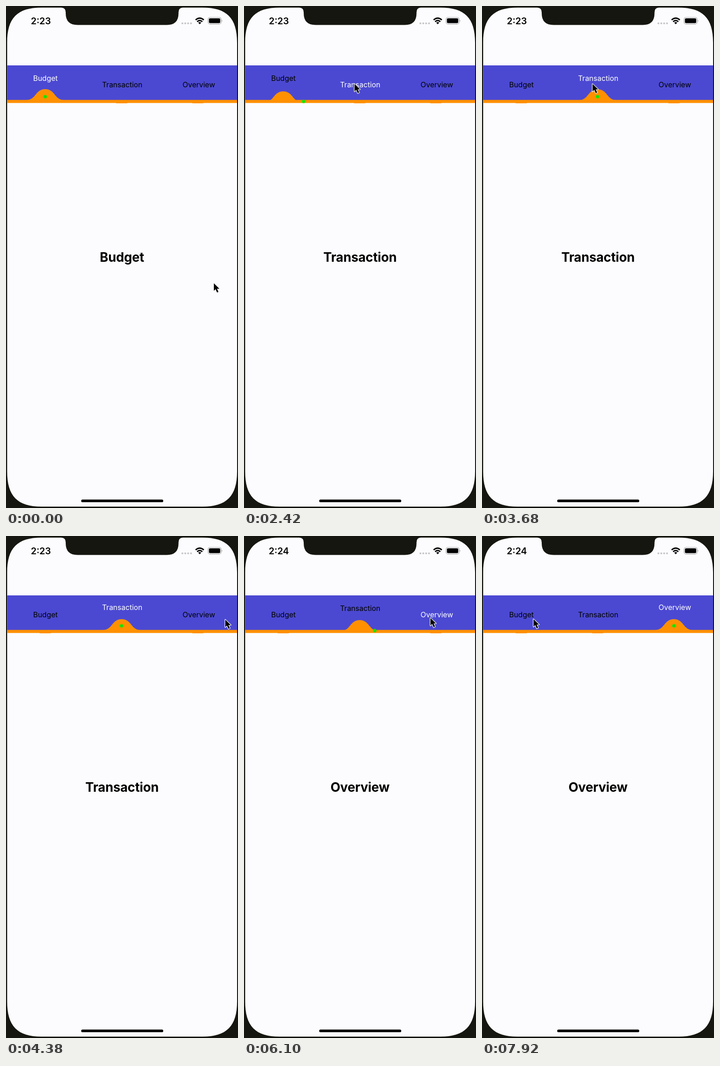
Recreate the animation shown at these times as an HTML page. Size 509x1099 px, loop 8000 ms.

```html
<!DOCTYPE html>
<html lang="en">
<head>
<meta charset="utf-8">
<title>Tab bar</title>
<style>
html, body { margin: 0; width: 100%; height: 100%; overflow: hidden; background: #15160f; }
svg { display: block; width: 100%; height: 100%; font-family: Inter, Roboto, sans-serif; text-anchor: middle; }
.label { font-size: 16px; --on: #fff; --off: #000; }
.title { font-size: 28px; font-weight: 700; letter-spacing: -.15px; --on: #000; --off: transparent; }
.clock { font-size: 20px; font-weight: 600; --on: #000; --off: transparent; }

/* Which tab is selected, and the minute shown */
.first { animation: first 8s step-end infinite; }
.second { animation: second 8s step-end infinite; }
.third { animation: third 8s step-end infinite; }
.before { animation: before 8s step-end infinite; }
.after { animation: after 8s step-end infinite; }
@keyframes first { 0% { fill: var(--on) } 25%, 100% { fill: var(--off) } }
@keyframes second { 0% { fill: var(--off) } 25% { fill: var(--on) } 71.7%, 100% { fill: var(--off) } }
@keyframes third { 0% { fill: var(--off) } 71.7%, 100% { fill: var(--on) } }
@keyframes before { 0% { fill: var(--on) } 58.5%, 100% { fill: var(--off) } }
@keyframes after { 0% { fill: var(--off) } 58.5%, 100% { fill: var(--on) } }

/* Labels lift above the selected bump */
.lift1 { animation: lift1 8s linear infinite; }
.lift2 { animation: lift2 8s linear infinite; }
.lift3 { animation: lift3 8s linear infinite; }
@keyframes lift1 {
  0%, 30.25% { transform: translateY(-14px); animation-timing-function: ease-in-out }
  36%, 100% { transform: none }
}
@keyframes lift2 {
  0%, 34% { transform: none; animation-timing-function: ease-out }
  42% { transform: translateY(-13.4px) }
  46% { transform: translateY(-14px) }
  52%, 74.5% { transform: translateY(-16px) }
  76.25% { transform: translateY(-14px); animation-timing-function: ease-out }
  82%, 100% { transform: none }
}
@keyframes lift3 {
  0%, 80.7% { transform: none; animation-timing-function: ease-out }
  88.7% { transform: translateY(-13.4px) }
  92.7% { transform: translateY(-14px) }
  98.7%, 100% { transform: translateY(-16px) }
}

/* Bumps sink into and rise out of the bar */
.bump1 { animation: bump1 8s linear infinite; }
.bump2 { animation: bump2 8s linear infinite; }
.bump3 { animation: bump3 8s linear infinite; }
@keyframes bump1 {
  0%, 29% { transform: none }
  30.25% { transform: translateY(4.8px) }
  34.5%, 100% { transform: translateY(27px) }
}
@keyframes bump2 {
  0%, 34% { transform: translateY(27px); animation-timing-function: ease-out }
  42% { transform: translateY(.8px) }
  46% { transform: translateY(.4px) }
  52%, 75.4% { transform: none }
  76.25% { transform: translateY(2px) }
  81%, 100% { transform: translateY(27px) }
}
@keyframes bump3 {
  0%, 80.7% { transform: translateY(27px); animation-timing-function: ease-out }
  88.7% { transform: translateY(.8px) }
  98.7%, 100% { transform: none }
}

/* The dot drops, runs along the bar and climbs again */
.run { animation: run 8s cubic-bezier(.455, .03, .515, .955) infinite; }
.drop { animation: drop 8s ease-in-out infinite; }
@keyframes run {
  0%, 25% { transform: translateX(86px) }
  39.75%, 71.7% { transform: translateX(253.4px) }
  86.45%, 100% { transform: translateX(421px) }
}
@keyframes drop {
  0%, 25% { transform: translateY(198.5px) }
  30%, 34.5% { transform: translateY(209px) }
  42% { transform: translateY(199px) }
  46% { transform: translateY(198.5px) }
  52%, 71.7% { transform: translateY(196.6px) }
  76.25% { transform: translateY(207px) }
  77%, 81.2% { transform: translateY(209px) }
  88.7% { transform: translateY(199px) }
  92.7% { transform: translateY(198.5px) }
  98.7%, 100% { transform: translateY(196.6px) }
}

.cursor { animation: cursor 8s ease-in-out infinite; }
@keyframes cursor {
  0%, .25% { transform: translate(455px, 605px); animation-timing-function: linear }
  4.1%, 6% { transform: translate(303px, 300px); animation-timing-function: ease-out }
  14.5%, 16.2% { transform: translate(249px, 190px) }
  23.5%, 46% { transform: translate(241.5px, 168.5px) }
  54.5%, 56.5% { transform: translate(480px, 181px) }
  62%, 66% { transform: translate(398.5px, 171.5px) }
  71%, 84% { transform: translate(408px, 177.5px); animation-timing-function: ease-in }
  89% { transform: translate(290px, 196px); animation-timing-function: ease-out }
  97.2% { transform: translate(105px, 183px) }
  99%, 100% { transform: translate(112px, 180px) }
}
</style>
</head>
<body>
<svg viewBox="0 0 509 1099" preserveAspectRatio="none">
  <defs>
    <clipPath id="bar"><rect x="2.5" y="130" width="504.5" height="82.5"/></clipPath>
    <path id="bump" d="M-42 206C-20 206-22 182 0 182S20 206 42 206Z"/>
  </defs>
  <rect width="509" height="1099" fill="#15160f"/>
  <path fill="#fcfcfe" d="M2.5 80C2.5 26 25 3.5 78 3.5H121Q131 3.5 131 14V16Q131 41.5 157 41.5H353Q378.500 41.500 378.500 16V14Q378.500 3.500 388 3.500H431C484 3.500 507 26 507 80V1019C507 1073 484 1096 431 1096H78C25 1096 2.500 1073 2.500 1019Z"/>

  <g class="clock">
    <text class="before" x="76.500" y="39.500">2:23</text>
    <text class="after" x="76.500" y="39.500">2:24</text>
  </g>
  <path d="M387 38H406" stroke="#c4c4c6" stroke-width="4.200" stroke-linecap="round" stroke-dasharray="0 6.300"/>
  <g fill="none" stroke="#000" stroke-width="3">
    <path d="M416 30.500Q425 22.500 434 30.500M419.300 34.300Q425 29.300 430.700 34.300"/>
    <path d="M421.700 36.600Q425 33.800 428.300 36.600L425 40Z" fill="#000" stroke="none"/>
  </g>
  <rect x="443.300" y="25" width="28.700" height="14.600" rx="4.200" fill="none" stroke="#a2a2a4" stroke-width="1.200"/>
  <rect x="445.200" y="27" width="24.800" height="10.600" rx="2.500"/>
  <path d="M473.300 30Q476 32.300 473.300 34.700Z" fill="#a2a2a4"/>

  <rect x="2.500" y="130" width="504.500" height="76" fill="#4b49d2"/>
  <g clip-path="url(#bar)" fill="#ff9000">
    <rect x="2.500" y="205.600" width="504.500" height="7"/>
    <g transform="translate(86)"><use class="bump1" href="#bump"/></g>
    <g transform="translate(253.700)"><use class="bump2" href="#bump"/></g>
    <g transform="translate(421)"><use class="bump3" href="#bump"/></g>
  </g>
  <g class="run"><circle class="drop" r="3.700" fill="#0ee800"/></g>

  <g class="label">
    <g class="lift1"><text class="first" x="86.500" y="178">Budget</text></g>
    <g class="lift2"><text class="second" x="255" y="178">Transaction</text></g>
    <g class="lift3"><text class="third" x="423" y="178">Overview</text></g>
  </g>
  <g class="title">
    <text class="first" x="254.500" y="560">Budget</text>
    <text class="second" x="254.500" y="560">Transaction</text>
    <text class="third" x="254.500" y="560">Overview</text>
  </g>
  <rect x="165" y="1080.500" width="180" height="5.800" rx="2.900"/>

  <path class="cursor" d="M1 2V18.500L4.800 15L8 22.300L11.200 21L8 13.900H13.200Z" stroke="#fff" stroke-width="2.400" stroke-linejoin="round" paint-order="stroke"/>
</svg>
</body>
</html>
```
